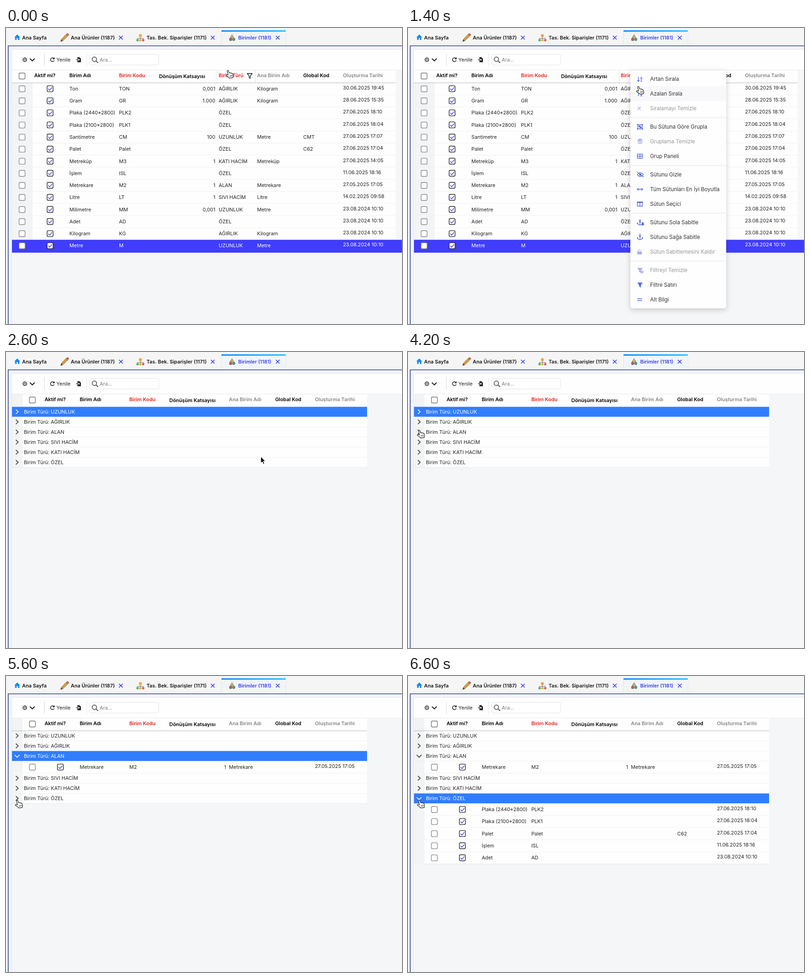
Animation, 862 px wide and 644 px high, one loop 6.8 s. Source, as an HTML page:

```html
<!DOCTYPE html>
<html lang="tr">
<head>
<meta charset="utf-8">
<title>Birimler</title>
<style>
html, body { margin: 0; width: 100%; height: 100%; overflow: hidden; background: #f5f6f7; }
svg { display: block; width: 862px; height: 644px; }
text { font: 10.85px Inter, "Noto Sans", sans-serif; fill: #222; }
.b { font-weight: 600; }
.menu text { font-size: 11.5px; fill: #333; }
.menu .off text { fill: #969696; }
.menu .ico { stroke: #4f68e2; fill: none; stroke-width: 1.3; }
.menu .off .ico { opacity: .5; }
.menu .ico .f { fill: #4f68e2; stroke: none; }
.menu .ico text { font-size: 6.5px; font-weight: 700; fill: #4f68e2; stroke: none; }
</style>
</head>
<body>
<svg viewBox="0 0 862 644">
  <defs>
    <linearGradient id="tabTop"><stop stop-color="#1287f5"/><stop offset="1" stop-color="#1fc3fa"/></linearGradient>
    <filter id="shadow" x="-20%" y="-10%" width="140%" height="120%">
      <feDropShadow dx="0" dy="3" stdDeviation="6" flood-color="#000" flood-opacity=".2"/>
    </filter>
  </defs>
  <g id="chrome"></g>
  <g id="table"></g>
  <g id="menu" class="menu"></g>
  <g id="hand" fill="#fff" stroke="#222" stroke-width="1.2" stroke-linejoin="round">
    <path d="M-1.6 1.2C-2-.5 .8-.9 1.3.8L2.8 5.4C3.4 4.5 5.2 4.5 5.6 5.8 6.4 4.9 8 5.2 8.3 6.5 9.4 5.9 10.6 6.6 10.8 7.9L11.4 11.2C11.6 12.7 11 13.7 10.8 15.6L3.2 16.6C2 14.6-.6 13.2-3.4 11.3-5.2 10-3.6 8.2-1.8 9L.4 10Z"/>
    <path d="M4.2 10.4l.6 3.4M6.4 10l.6 3.4M8.5 9.7l.6 3.4" fill="none" stroke-width=".9"/>
  </g>
  <path id="arrow" d="M0 0V14.2L3.3 11.2 5.6 16.5 8 15.4 5.7 10.3H10Z" fill="#111" stroke="#fff"/>
</svg>
<script>
const LOOP = 6800, STEP = 200, ROW = 26.27, GROUP = 22, TOP = 119.3;
const $ = id => document.getElementById(id);

const text = (x, y, s, attrs = '') => `<text x="${x}" y="${y}" ${attrs}>${s}</text>`;
const rect = (x, y, w, h, fill, attrs = '') =>
  `<rect x="${x}" y="${y}" width="${w}" height="${h}" fill="${fill}" ${attrs}/>`;
const line = (d, stroke, width = 1, attrs = '') =>
  `<path d="${d}" fill="none" stroke="${stroke}" stroke-width="${width}" ${attrs}/>`;
const fill = color => `style="fill:${color}"`;

const units = `Ton|TON|0,001|AĞIRLIK|Kilogram||30.06.2025 19:45
Gram|GR|1.000|AĞIRLIK|Kilogram||28.06.2025 15:35
Plaka (2440*2800)|PLK2||ÖZEL|||27.06.2025 18:10
Plaka (2100*2800)|PLK1||ÖZEL|||27.06.2025 18:04
Santimetre|CM|100|UZUNLUK|Metre|CMT|27.06.2025 17:07
Palet|Palet||ÖZEL||C62|27.06.2025 17:04
Metreküp|M3|1|KATI HACİM|Metreküp||27.06.2025 14:05
İşlem|ISL||ÖZEL|||11.06.2025 18:16
Metrekare|M2|1|ALAN|Metrekare||27.05.2025 17:05
Litre|LT|1|SIVI HACİM|Litre||14.02.2025 09:58
Milimetre|MM|0,001|UZUNLUK|Metre||23.08.2024 10:10
Adet|AD||ÖZEL|||23.08.2024 10:10
Kilogram|KG||AĞIRLIK|Kilogram||23.08.2024 10:10
Metre|M||UZUNLUK|Metre||23.08.2024 10:10`.split('\n').map(s => s.split('|'));
const groups = ['UZUNLUK', 'AĞIRLIK', 'ALAN', 'SIVI HACİM', 'KATI HACİM', 'ÖZEL'];

const flatCols = { shift: 0, type: 463, base: 546.5, global: 647, date: 733.5, right: 848 };
const groupCols = { shift: 22.4, base: 485.3, global: 586, date: 672.5, right: 786 };

function checkbox(x, y, on, stroke = on ? '#2a2a2a' : '#8b8b8b') {
  return rect(x + .5, y + .5, 13, 13, '#fff', `rx="2.5" stroke="${stroke}" stroke-width="1.4"`) +
    (on ? line(`M${x + 3} ${y + 7.2}l3 3 5.4-6`, '#4545ee', 1.5) : '');
}

function header(c) {
  const s = c.shift, h = (x, label, color = '#000', y = 106.6) => text(x, y, label, `class="b" ${fill(color)}`);
  return rect(13, 92, c.right - 13, 27.3, '#fefefe') +
    checkbox(28 + s, 97.5, false, '#777') +
    h(61.5 + s, 'Aktif mi?') + h(138 + s, 'Birim Adı') + h(246 + s, 'Birim Kodu', '#f41c16') +
    h(333.2 + s, 'Dönüşüm Katsayısı', '#000', 108.8) +
    (c.type ? h(c.type, 'Birim Türü', '#f41c16') +
      line('M459.5 92V119M542.5 92V119', '#dfe1e4') +
      line('M525 99h11l-4.2 5.2v5.6l-2.6-1.8v-3.8z', '#111', 1.3, 'stroke-linejoin="round"') : '') +
    h(c.base, 'Ana Birim Adı', '#858585') + h(c.global, 'Global Kod') + h(c.date, 'Oluşturma Tarihi', '#858585');
}

function unitRow(c, unit, y, selected) {
  const [name, code, factor, type, base, global, date] = unit;
  const s = c.shift, ink = selected ? fill('#fff') : '', base1 = y + 16.6;
  const left = s ? 36 : 13;
  return (selected ? rect(13, y, 849, 28, '#403dfe') :
      rect(left, y, c.right - left, ROW, '#fefefe') +
      rect(13, y, s ? 23 : 45, ROW, '#f3f4f5') +
      line(`M${left} ${y + ROW}H${c.right}`, '#e4e6e9')) +
    checkbox(28 + s, y + 6, false) + checkbox(89 + s, y + 5.8, true) +
    text(138 + s, base1, name, ink) + text(246 + s, base1, code, ink) +
    text(455.6 + (s ? 23.6 : 0), base1, factor, `text-anchor="end" ${ink}`) +
    (c.type ? text(c.type, base1, type, ink) : '') +
    text(c.base, base1, base, ink) + text(c.global, base1, global, ink) +
    text(c.date, y + 14.6, date, ink);
}

function flatTable() {
  return header(flatCols) +
    units.map((u, i) => unitRow(flatCols, u, TOP + i * ROW, i === 13)).join('') +
    line(`M13 ${TOP}H848`, '#b5b7ba');
}

function groupedTable(open, selected) {
  let y = TOP, out = header(groupCols) + rect(13, 92, 23, 27, '#f2f3f5');
  for (const g of groups) {
    const on = g === selected, isOpen = open.includes(g), m = y + 11;
    out += rect(13, y, 773, GROUP, on ? '#307dfd' : '#fefefe') +
      (on ? '' : rect(13, y, 23, GROUP, '#f3f4f5')) +
      line(`M13 ${y + GROUP}H786`, '#e4e6e9') +
      line(isOpen ? `M19 ${m - 2.5}l5.2 5 5.2-5` : `M21.5 ${m - 5}l5 4.8-5 4.8`, on ? '#d5e4ff' : '#555', 2) +
      text(39, y + 14.8, 'Birim Türü: ' + g, on ? fill('#fff') : '');
    y += GROUP;
    if (isOpen) for (const u of units.filter(u => u[3] === g)) {
      out += unitRow(groupCols, u, y);
      y += ROW;
    }
  }
  return out + (selected === groups[0] ? '' : line(`M13 ${TOP}H786`, '#b5b7ba'));
}

function chrome() {
  const close = x => line(`M${x - 4} 17l8 8m0-8l-8 8`, '#3d3df0', 1.7);
  const tab = (x, label, color = '#161616') => text(x, 25.2, label, `class="b" ${fill(color)}`);
  const dot = (x, y, color) => `<circle cx="${x}" cy="${y}" r="2.6" fill="${color}"/>`;
  const gear = Array.from({ length: 8 }, (_, i) =>
    `<path d="M41 64v1.6" stroke="#333" stroke-width="2" transform="rotate(${i * 45} 41 69)"/>`).join('');
  return rect(0, 0, 862, 644, '#f5f6f7') +
    rect(0, 0, 862, 38, '#f5f5f6') + rect(0, 38, 4, 606, '#f0efef') +
    // tabs
    rect(469, 5, 140, 33, '#f1f5fa') + rect(469, 5, 140, 3, 'url(#tabTop)') +
    line('M468.5 8V38M609.5 8V38', '#e2e6ec') +
    `<path d="M18 20.5L24.5 14l6.5 6.5h-1.8V26h-3.3v-4h-2.8v4h-3.3v-5.5z" fill="#1b8de8"/>` +
    tab(35, 'Ana Sayfa') +
    `<path d="M118.5 30l1.8-5.2 3.2 3.2z" fill="#333"/>` +
    `<path d="M120.3 24.8L131 13.8l3.6 3.4L123.6 28z" fill="#eeb24a" stroke="#7a4b22" stroke-width=".9"/>` +
    line('M122 26.3L132.7 15.5', '#9a5f25') +
    `<path d="M131 13.8l1.6-1.5q2-.9 3.4.8 1.1 1.4.2 2.7l-1.6 1.4z" fill="#d86a62" stroke="#7a4b22" stroke-width=".7"/>` +
    tab(141, 'Ana Ürünler (1187)') + close(250) +
    line('M292.5 18v6M286 25v-2.5h13V25', '#777') +
    rect(289.5, 13.5, 6, 6, '#f1a03b', 'rx="1.5"') +
    dot(286.4, 26.4, '#58b458') + dot(292.5, 26.4, '#e2b13a') + dot(298.7, 26.4, '#e0605c') +
    tab(306, 'Tas. Bek. Siparişler (1171)') + close(450) +
    '<path d="M492 14.5l3.8 6.3h-7.6z" fill="#f0b93a" stroke="#555" stroke-width=".8"/>' +
    rect(486.5, 22, 5, 5.5, '#d9534f', 'rx=".8" stroke="#555" stroke-width=".8"') +
    '<circle cx="495.7" cy="24.7" r="2.9" fill="#37a7a0" stroke="#555" stroke-width=".8"/>' +
    tab(505.5, 'Birimler (1181)', '#3c3cf2') + close(591.5) +
    // panel frame
    line('M4.8 644V38.7H862', '#2f489f', 1.6) +
    line('M12.5 644V46.5H862', '#dde5ee') +
    // toolbar
    rect(13, 47, 849, 45, '#fefefe') + line('M13 91.5H862', '#e8eaed') +
    gear + '<circle cx="41" cy="69" r="3.7" fill="#fff" stroke="#333" stroke-width="1.2"/><circle cx="41" cy="69" r="1.4" fill="none" stroke="#333"/>' +
    line('M52 66.5l5.2 5 5.2-5', '#222', 2) +
    line('M83.5 55V83', '#d9dbde') + line('M175.5 55V83', '#e6e8ea') +
    line('M104.3 66.2A4.2 4.2 0 1 0 105 70.4', '#222', 1.5) +
    '<path d="M105.8 63.5v4.6h-4.6z" fill="#222"/>' +
    text(109.8, 73, 'Yenile') +
    '<path d="M155.5 63.5h4.2l3.3 3.2v7.8h-7.5z" fill="#222"/>' +
    line('M152.5 69h3', '#222', 1.4) + line('M155.5 69h4.2m-2-2.2l2.2 2.2-2.2 2.2', '#fff', 1.2) +
    rect(182.5, 57.5, 150, 23, '#fff', 'rx="3" stroke="#e2e4e7"') +
    '<circle cx="192.4" cy="68" r="4.8" fill="none" stroke="#555" stroke-width="1.7"/>' +
    line('M196 71.6l4.4 4.4', '#555', 2) + text(204, 73, 'Ara...', fill('#777'));
}

const f = d => `<path class="f" d="${d}"/>`, p = d => `<path d="${d}"/>`;
const sortIcon = (arrow, a, b) => p(arrow) + text(.6, -.2, a) + text(.6, 6, b);
const anchor = '<circle cx="0" cy="-4.2" r="1.5"/>' + p('M0-2.6V5.6M-2.6-.6H2.6M-5.4 1.2Q-5 5.6 0 5.6 5 5.6 5.4 1.2M-6.4 2.8l1-1.8 1.6 1.4M6.4 2.8l-1-1.8-1.6 1.4');
const funnel = f('M-6-5H6L1.8.4V6L-1.8 3.6V.4z');

// A leading "-" marks a disabled item.
const menuItems = [
  ['Artan Sırala', sortIcon('M-3.5-5V5M-6 2.5l2.5 2.7 2.5-2.7', 'A', 'Z')],
  ['Azalan Sırala', sortIcon('M-3.5 5V-5M-6-2.5l2.5-2.7 2.5 2.7', 'Z', 'A')],
  ['-Sıralamayı Temizle', p('M-5.5-3.5l7 7m0-7l-7 7')],
  ['Bu Sütuna Göre Grupla', p('M-5-4.5H5V4.5H-5z') + f('M-3-2.8H1V.8H-3zM0-.4H3.4V3H-1V1.4H0zM-6.5-6h2.6v2.6h-2.6zM3.9-6h2.6v2.6H3.9zM-6.5 3.4h2.6V6h-2.6zM3.9 3.4h2.6V6H3.9z')],
  ['-Gruplama Temizle', f('M0-6.5L6.4-3.6 0-.7-6.4-3.6zM-6.4-.8l2-.9L0 .4l4.4-2.1 2 .9L0 2.2zM-6.4 2.6l2-.9L0 3.8l4.4-2.1 2 .9L0 5.8z')],
  ['Grup Paneli', p('M-5.7-4.5H5.3V4.5H-5.7zM-.2-4.5V4.5M-5.7 0H5.3')],
  ['Sütunu Gizle', p('M-5.8 0Q1-8.6 7.2 0 1 8.6-5.8 0zM-6-5.5L8 5.5') + f('M.8-2.6A2.6 2.6 0 1 1 .7-2.6z')],
  ['Tüm Sütunları En İyi Boyutla', p('M-5.8 0H5.8M-3.4-2.6L-6 0l2.6 2.6M3.4-2.6L6 0 3.4 2.6')],
  ['Sütun Seçici', p('M-5.7-4.5H5.3V4.5H-5.7zM-.2-4V4.5') + f('M-6.2-5H5.8v2.6H-6.2z')],
  ['Sütunu Sola Sabitle', anchor + f('M3.6 2H8.4V6.4H3.6z') + p('M4.7 2V.6Q6 -1 7.3 .6V2')],
  ['Sütunu Sağa Sabitle', anchor],
  ['-Sütun Sabitlemesini Kaldır', f('M-6-.8H4V5.6H-6z') + p('M-3.8-.8V-3Q-1-7.6 1.8-3')],
  ['-Filtreyi Temizle', funnel + '<circle class="f" cx="4.6" cy="3.6" r="3.2"/><path d="M3.4 2.4l2.4 2.4m0-2.4L3.4 4.8" style="stroke:#fff;stroke-width:.9"/>'],
  ['Filtre Satırı', funnel],
  ['Alt Bilgi', p('M-6-2H4.6M-6 2H4.6')],
];
const itemY = i => 111 + 32 * i + 8 * Math.floor(i / 3);

function contextMenu(hover) {
  return rect(484, 92, 208.5, 518, '#fefefe', 'rx="6" filter="url(#shadow)"') +
    (hover >= 0 ? rect(484, itemY(hover) - 16, 208.5, 32, '#f8f8fa') : '') +
    [195, 299, 403, 507].map(y => line(`M484 ${y}H692.5`, '#e2e4e7')).join('') +
    menuItems.map(([label, icon], i) => {
      const off = label[0] === '-', y = itemY(i);
      return `<g class="${off ? 'off' : ''}"><g class="ico" transform="translate(505 ${y})">${icon}</g>` +
        text(527, y + 4.2, off ? label.slice(1) : label) + '</g>';
    }).join('');
}

// Pointer tip: start, end, x, y; it eases to each place and rests there.
const moves = [[0, 0, 483, 92.5], [1000, 2200, 554.5, 227.5], [2800, 4000, 24.5, 170.5], [4600, 5600, 24.5, 270.5]];
const ease = k => k * k * (3 - 2 * k);
function pointer(t) {
  let [, , x, y] = moves[0];
  for (const [a, b, tx, ty] of moves.slice(1)) {
    const k = ease(Math.min(1, Math.max(0, (t - a) / (b - a))));
    x += (tx - x) * k;
    y += (ty - y) * k;
  }
  return [x, y];
}

const MENU_AT = 400, GROUP_AT = 2600, OPEN_AREA = 4400, OPEN_CUSTOM = 6000;
function tableAt(t) {
  if (t < GROUP_AT) return flatTable();
  if (t < OPEN_AREA) return groupedTable([], 'UZUNLUK');
  if (t < OPEN_CUSTOM) return groupedTable(['ALAN'], 'ALAN');
  return groupedTable(['ALAN', 'ÖZEL'], 'ÖZEL');
}

function draw(t) {
  const [x, y] = pointer(t), menuOpen = t >= MENU_AT && t < GROUP_AT;
  const hover = menuItems.findIndex((_, i) => x > 486 && Math.abs(y - itemY(i)) < 16);
  $('table').innerHTML = tableAt(t);
  $('menu').innerHTML = menuOpen ? contextMenu(hover) : '';
  const isHand = t < GROUP_AT || x < 36;
  for (const [id, on] of [['hand', isHand], ['arrow', !isHand]]) {
    $(id).setAttribute('transform', `translate(${x} ${y})`);
    $(id).setAttribute('visibility', on ? 'visible' : 'hidden');
  }
}

$('chrome').innerHTML = chrome();
let shown = -1;
const start = performance.now();
function tick() {
  const t = Math.floor(((performance.now() - start) % LOOP) / STEP) * STEP;
  if (t !== shown) draw(shown = t);
  requestAnimationFrame(tick);
}
tick();
</script>
</body>
</html>
```
